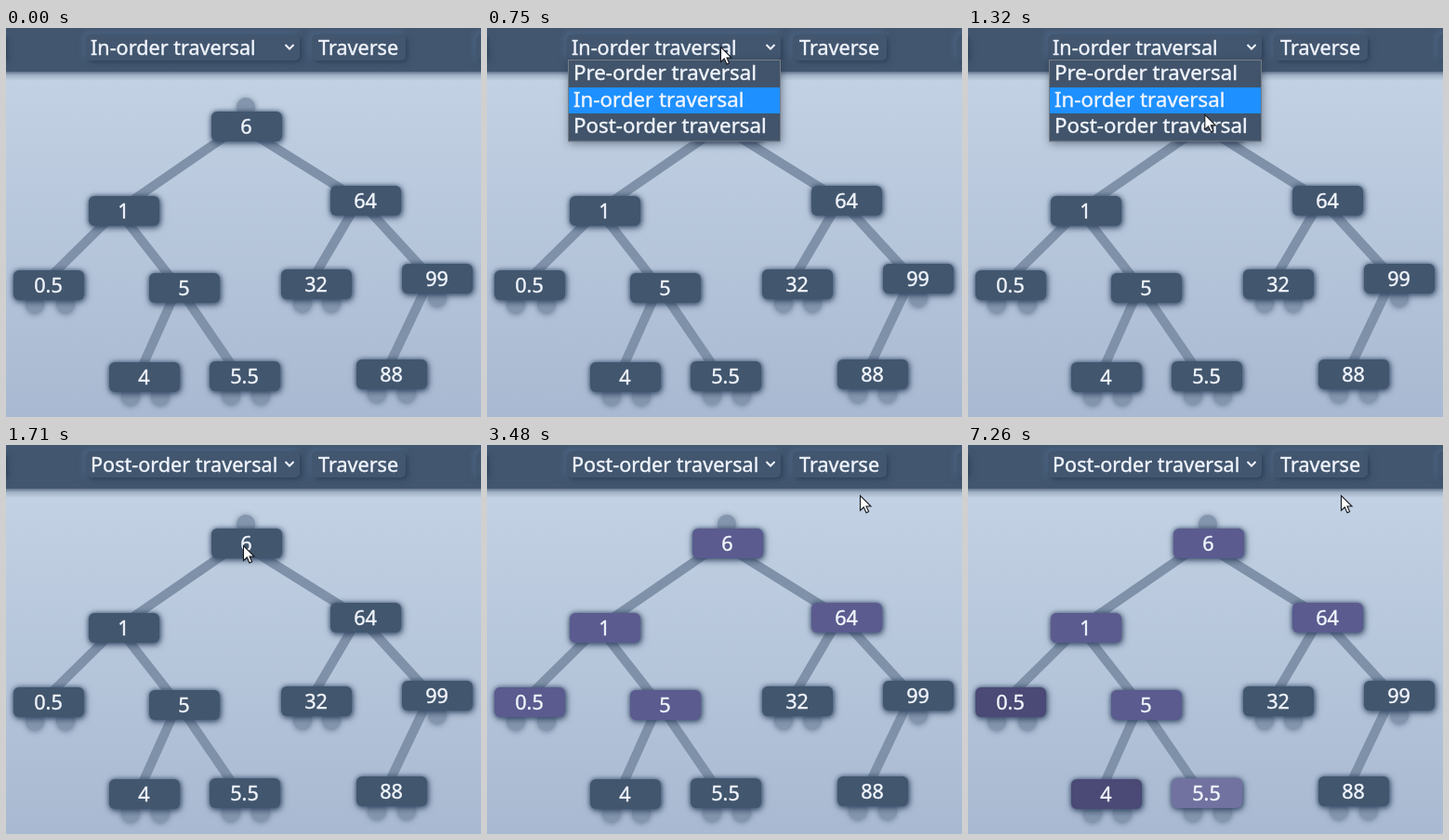
These frames come from a looping animation (511 by 419 pixels, 8000 ms). An HTML page:

```html
<!DOCTYPE html>
<html lang="en">
<head>
<meta charset="utf-8">
<title>Tree traversal</title>
<style>
html, body { margin: 0; width: 100%; height: 100%; overflow: hidden; background: #b7c7db; }
svg { display: block; width: 100%; height: 100%; }
text { font: 21.6px "Noto Sans", "Open Sans", sans-serif; fill: #f1f5fd; stroke: #f1f5fd; stroke-width: .4px; white-space: pre; }
.popup text { font-size: 22.3px; }
.mid { text-anchor: middle; }
.node { filter: drop-shadow(0 0 2.5px rgba(50, 74, 104, .75)) drop-shadow(1px 2px 3px rgba(36, 56, 82, .7)); }
.port { fill: #8496ad; filter: drop-shadow(0 1px 3px rgba(60, 82, 110, .65)); }
.button { fill: #42566f; filter: drop-shadow(2px 2px 3px #2a3a50) drop-shadow(-2px -2px 3px #506a89); }
.popup { filter: drop-shadow(1px 2px 5px rgba(30, 45, 65, .5)); }
</style>
</head>
<body>
<svg viewBox="0 0 511 419" preserveAspectRatio="none">
  <defs>
    <linearGradient id="sky" x1="0" y1="0" x2="0" y2="1">
      <stop offset="0" stop-color="#c6d5e6"/>
      <stop offset="1" stop-color="#a9b9d1"/>
    </linearGradient>
    <linearGradient id="shade" x1="0" y1="0" x2="0" y2="1">
      <stop offset="0" stop-color="#42566f" stop-opacity=".75"/>
      <stop offset=".4" stop-color="#42566f" stop-opacity=".25"/>
      <stop offset="1" stop-color="#42566f" stop-opacity="0"/>
    </linearGradient>
  </defs>
  <rect width="511" height="419" fill="url(#sky)"/>
  <rect y="47" width="511" height="10" fill="url(#shade)"/>
  <rect width="511" height="47" fill="#42566f"/>
  <rect class="button" x="-40" y="7" width="40" height="28" rx="5"/>
  <rect class="button" x="86" y="7" width="230" height="28" rx="5"/>
  <rect class="button" id="go" x="329" y="7" width="101" height="28" rx="5"/>
  <rect class="button" x="506" y="7" width="60" height="28" rx="5"/>
  <text id="choice" x="91" y="28.5"></text>
  <path d="M300.5 18l4.5 4.5 4.5-4.5" fill="none" stroke="#f1f5fd" stroke-width="2"/>
  <text x="336" y="28.5">Traverse</text>
  <g id="edges" stroke="#7f91a8" stroke-width="10"></g>
  <g id="ports"></g>
  <g id="nodes"></g>
  <g id="popup" class="popup">
    <rect x="87.5" y="34.5" width="228" height="87.5" fill="#41546b" stroke="#777c84"/>
    <rect id="mark" x="88" width="227" height="28" fill="#1e90ff"/>
  </g>
  <path id="cursor" d="M.5.5V16.5L4.3 13 7 19 9.6 17.8 7 12H12Z" fill="#fff" stroke="#17191f" stroke-width="1.1"/>
</svg>
<script>
const LOOP = 8000;
const $ = id => document.getElementById(id);
const BASE = [66, 86, 110], ACTIVE = [91, 91, 143], CURRENT = [114, 114, 160], DONE = [75, 73, 117];
const OPTIONS = ['Pre-order traversal', 'In-order traversal', 'Post-order traversal'];

// left, top, label, parent, offsets of free ports, colour changes [start, end, colour]
const first = [[2370, 2460, ACTIVE]];
const nodes = [
  [221, 90, '6', -1, [], first],
  [89, 181, '1', 0, [], first],
  [349, 170, '64', 0, [], first],
  [8, 261, '0.5', 1, [23, 56], [[3390, 3480, ACTIVE], [4290, 4350, CURRENT], [5250, 5310, DONE]]],
  [154, 264, '5', 1, [], [[3390, 3480, ACTIVE]]],
  [296, 260, '32', 2, [23, 54], []],
  [426, 254, '99', 2, [38], []],
  [111, 360, '4', 4, [23, 55], [[5250, 5310, ACTIVE], [6210, 6270, CURRENT], [7170, 7260, DONE]]],
  [219, 359, '5.5', 4, [23, 55], [[5250, 5310, ACTIVE], [7170, 7260, CURRENT]]],
  [377, 357, '88', 6, [22, 54], []]
];

const outQuad = p => 1 - (1 - p) ** 2;
const outSine = p => Math.sin(p * Math.PI / 2);
const inOut = p => p * p * (3 - 2 * p);

// start, end, from, to, easing
const moves = [
  [210, 630, [500, 56], [251, 20], outQuad],
  [930, 1560, [251, 20], [255, 108], outSine],
  [1710, 2100, [255, 108], [382, 13], inOut],
  [2790, 3030, [382, 13], [401, 54], inOut]
];

const clamp = p => Math.min(1, Math.max(0, p));
const mix = (a, b, p) => a.map((v, i) => v + (b[i] - v) * p);

function add(parent, tag, attrs, label) {
  const el = document.createElementNS('http://www.w3.org/2000/svg', tag);
  for (const key in attrs) el.setAttribute(key, attrs[key]);
  if (label) el.textContent = label;
  parent.appendChild(el);
  return el;
}

const port = (cx, cy) => add($('ports'), 'circle', { class: 'port', cx, cy, r: 10 });

const boxes = nodes.map(([x, y, label, parent, free]) => {
  if (parent < 0) port(x + 37, y - 5);
  else {
    const [px, py] = nodes[parent];
    const dx = x < px ? 30.5 : 32;
    add($('edges'), 'line', { x1: px + dx, y1: py + 16, x2: x + dx, y2: y + 16 });
  }
  free.forEach(dx => port(x + dx, y + 36.5));
  const box = add($('nodes'), 'rect', { class: 'node', x, y, width: 76, height: 32, rx: 6 });
  add($('nodes'), 'text', { class: 'mid', x: x + 37.5, y: y + 23.5 }, label);
  return box;
});

OPTIONS.forEach((label, i) => add($('popup'), 'text', { x: 93, y: 56 + 28.5 * i }, label));

function cursorAt(t) {
  let pos = moves[0][2];
  for (const [start, end, from, to, ease] of moves)
    if (t >= start) pos = mix(from, to, ease(clamp((t - start) / (end - start))));
  return pos;
}

function colorAt(changes, t) {
  return changes.reduce((c, [start, end, to]) => mix(c, to, clamp((t - start) / (end - start))), BASE);
}

function draw(t) {
  const [x, y] = cursorAt(t);
  $('cursor').setAttribute('transform', `translate(${x} ${y})`);
  $('cursor').style.display = t < 240 ? 'none' : '';

  // the highlight trails the pointer slightly
  const hoverY = cursorAt(t - 30)[1];
  const row = hoverY < 34 ? 1 : Math.min(2, Math.floor((hoverY - 34) / 29));
  $('popup').style.display = t >= 750 && t < 1710 ? '' : 'none';
  $('mark').setAttribute('y', 36 + 28 * row);
  $('choice').textContent = OPTIONS[t < 1710 ? 1 : 2];

  $('go').style.fill = t >= 2340 && t < 2430 ? '#3a4c63' : '';
  boxes.forEach((box, i) => box.setAttribute('fill', `rgb(${colorAt(nodes[i][5], t).map(Math.round)})`));
}

const begin = performance.now();
function tick() {
  draw((performance.now() - begin) % LOOP);
  requestAnimationFrame(tick);
}
tick();
</script>
</body>
</html>
```
